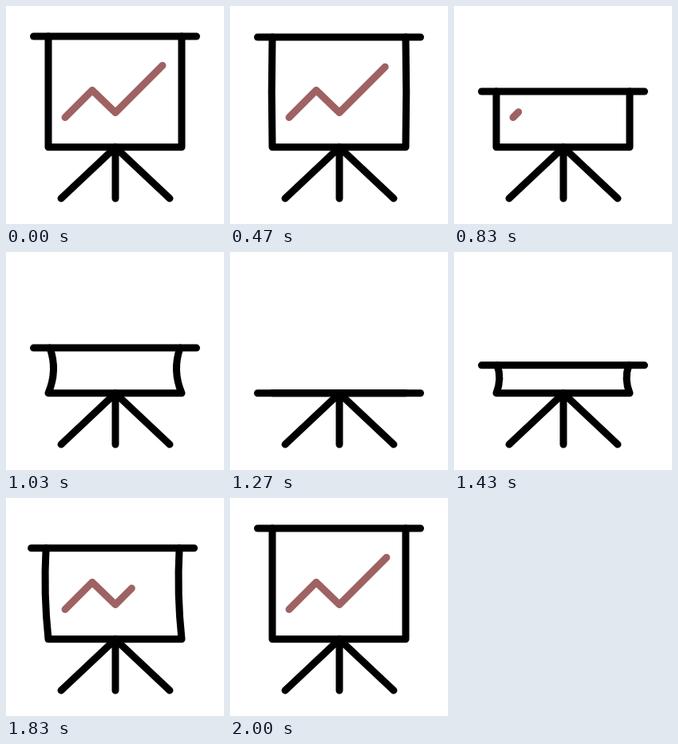
An HTML page that plays this animation: 273 px wide and 273 px high, repeating every 2.5 s.

```html
<!DOCTYPE html>
<html lang="en">
<head>
<meta charset="utf-8">
<title>Presentation board</title>
<style>
  html, body { margin: 0; width: 100%; height: 100%; overflow: hidden; background: #fff; }
  svg { display: block; width: 100vw; height: 100vh; }
  path { fill: none; stroke: #000; stroke-width: 9; stroke-linecap: round; stroke-linejoin: round; }
  #chart { stroke: #9f6262; }
</style>
</head>
<body>
<svg viewBox="0 0 273 273">
  <path id="chart" pathLength="1" d="M74 139.5L108 105.5L137 133.5L196 74.5"/>
  <path d="M69 241L137 177L205 241M137 177V241"/>
  <path id="sheet"/>
  <path id="bar"/>
</svg>
<script>
const LOOP = 2500, STEP = 100 / 3;
const TOP = 38, MIDDLE = 115, FLOOR = 176.7;
const LEFT = 53, RIGHT = 220, OVERHANG = 18.5;
const WOBBLE = 12; // steps one swing of the sheet lasts

const $ = id => document.getElementById(id);
const part = (f, a, b) => Math.min(1, Math.max(0, (f - a) / (b - a)));

// eased 0 to 1 between steps a and b
function ramp(f, a, b) {
  const u = part(f, a, b);
  return u * u * (3 - 2 * u);
}

// one swing out and back, starting at step a
const swing = (f, a) => Math.sin(Math.PI * part(f, a, a + WOBBLE));

function pose(f) {
  const upper = ramp(f, 13, 28) - ramp(f, 46.8, 60);
  const lower = ramp(f, 29.5, 38) - ramp(f, 38, 47.2);
  return {
    top: TOP + (MIDDLE - TOP) * upper + (FLOOR - MIDDLE) * lower,
    drawn: 1 - ramp(f, 13, 27) + ramp(f, 46.7, 60),
    bow: 3 * swing(f, 13) - 6.5 * swing(f, 25) - 4 * swing(f, 38),
    sway: -3 * swing(f, 48)
  };
}

function side(x, dir, { top, bow, sway }) {
  const topX = x + sway + dir * Math.min(0, bow) * 0.3;
  const midX = x + 1.3 * sway + dir * bow;
  const ctrlX = 2 * midX - (topX + x) / 2;
  return { topX, ctrl: `${ctrlX} ${(top + FLOOR) / 2}` };
}

function draw(now) {
  const p = pose(Math.floor((now % LOOP + 4) / STEP));
  const l = side(LEFT, -1, p), r = side(RIGHT, 1, p);
  $("bar").setAttribute("d",
    `M${LEFT - OVERHANG + p.sway} ${p.top}H${RIGHT + OVERHANG + p.sway}`);
  $("sheet").setAttribute("d",
    `M${l.topX} ${p.top}Q${l.ctrl} ${LEFT} ${FLOOR}H${RIGHT}Q${r.ctrl} ${r.topX} ${p.top}`);

  const chart = $("chart");
  chart.style.visibility = p.drawn > 0.001 ? "visible" : "hidden";
  chart.setAttribute("stroke-dasharray", p.drawn >= 1 ? "none" : `${p.drawn} 2`);
}

const start = performance.now();
function tick() {
  draw(performance.now() - start);
  requestAnimationFrame(tick);
}
tick();
</script>
</body>
</html>
```
